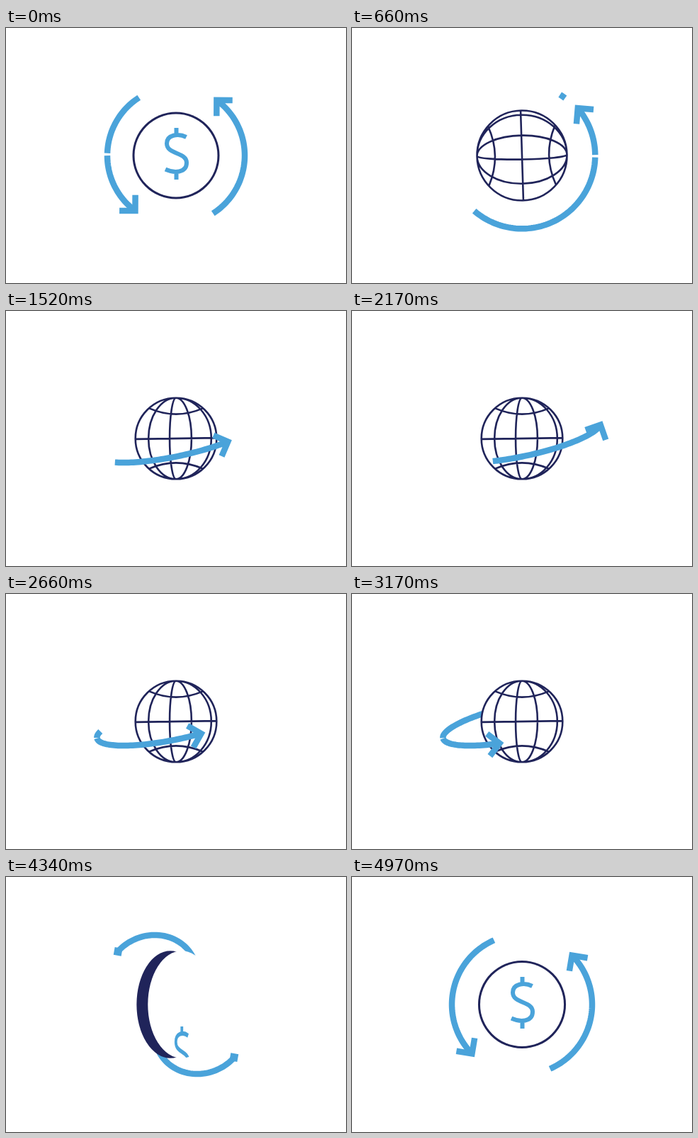
Write an HTML page with a canvas that moves like this. It is 480 by 360 pixels and loops after 5.01 s.

```html
<!DOCTYPE html>
<html lang="en">
<head>
<meta charset="utf-8">
<title>Coin and globe</title>
<style>
html, body { margin: 0; width: 100%; height: 100%; overflow: hidden; background: #fff; }
canvas { display: block; width: 480px; height: 360px; }
</style>
</head>
<body>
<canvas id="stage" width="480" height="360"></canvas>
<script>
const ctx = document.getElementById('stage').getContext('2d');
const LOOP = 5010, CX = 240, CY = 180;
const BLUE = '#4aa3da', NAVY = '#20245a';
const RAD = Math.PI / 180;

const ramp = (t, a, b) => Math.min(1, Math.max(0, (t - a) / (b - a)));
const smooth = (t, a, b) => { const k = ramp(t, a, b); return k * k * (3 - 2 * k); };
const mix = (a, b, k) => a + (b - a) * k;

// Cubic from v0 to v1 with end speeds m0 and m1 per millisecond
function hermite(t, t0, t1, v0, v1, m0, m1) {
  const k = ramp(t, t0, t1), d = t1 - t0, j = 1 - k;
  return v0 * (1 + 2 * k) * j * j + v1 * k * k * (3 - 2 * k) + d * k * j * (m0 * j - m1 * k);
}

// Tilted orbit, travelled at constant speed along its length
const ORBIT = { a: 114, b: 25, tilt: 12, period: 594.5, share: 0.338 };
const lengths = [0];
for (let i = 1; i <= 360; i++) {
  const r = (i - 0.5) * RAD;
  lengths.push(lengths[i - 1] + Math.hypot(ORBIT.a * Math.sin(r), ORBIT.b * Math.cos(r)) * RAD);
}
const perimeter = lengths[360];
const startTurn = mix(lengths[311], lengths[312], 0.4) / perimeter - 1 - 5.5 / perimeter;
const turnsAt = t => startTurn + (t - 1520) / ORBIT.period;

function orbitAngle(turns) {
  const whole = Math.floor(turns), goal = (turns - whole) * perimeter;
  let i = 1;
  while (i < 360 && lengths[i] < goal) i++;
  return 360 * whole + i - 1 + (goal - lengths[i - 1]) / (lengths[i] - lengths[i - 1]);
}

function ellipsePath(a, b, tilt) {
  const c = Math.cos(tilt * RAD), s = Math.sin(tilt * RAD);
  return deg => {
    const u = a * Math.cos(deg * RAD), v = -b * Math.sin(deg * RAD);
    return [CX + u * c + v * s, CY - u * s + v * c];
  };
}

const isBack = deg => Math.sin(deg * RAD) > 0;

// side: 'back' or 'front' draws only that half of the path
function arrow(path, tail, head, tip, lag = 0, side = '') {
  const shown = deg => !side || isBack(deg) === (side === 'back');
  if (head <= tail) return;
  ctx.strokeStyle = BLUE;
  ctx.lineWidth = 8.5;
  ctx.lineJoin = 'miter';
  ctx.beginPath();
  const steps = Math.ceil((head - tail) / 2);
  let pen = false;
  for (let i = 0; i <= steps; i++) {
    const deg = mix(tail, head, i / steps);
    if (!shown(deg)) { pen = false; continue; }
    const p = path(deg);
    pen ? ctx.lineTo(...p) : ctx.moveTo(...p);
    pen = true;
  }
  ctx.stroke();
  if (tip <= 0 || !shown(head)) return;
  const [x, y] = path(head), p = path(head - lag - 0.5), q = path(head - lag + 0.5);
  ctx.save();
  ctx.translate(x, y);
  ctx.rotate(Math.atan2(q[1] - p[1], q[0] - p[0]));
  ctx.beginPath();
  const arm = 15.8 * tip;
  ctx.moveTo(-arm, -arm);
  ctx.lineTo(0, 0);
  ctx.lineTo(-arm, arm);
  ctx.stroke();
  ctx.restore();
}

function disc(x, rx, ry, color) {
  ctx.beginPath();
  ctx.ellipse(x, CY, Math.max(0, rx), Math.max(0, ry), 0, 0, 7);
  ctx.fillStyle = color;
  ctx.fill();
}

function dollar() {
  ctx.strokeStyle = BLUE;
  ctx.lineWidth = 6;
  ctx.beginPath();
  ctx.moveTo(14.5, -26);
  ctx.bezierCurveTo(3, -32, -13, -29, -13, -17);
  ctx.bezierCurveTo(-13, -1, 15, -5, 15, 10);
  ctx.bezierCurveTo(15, 25, -3, 25, -15, 19.5);
  ctx.moveTo(0.5, -39);
  ctx.lineTo(0.5, -29);
  ctx.moveTo(0.5, 23);
  ctx.lineTo(0.5, 34);
  ctx.stroke();
}

// turn: 0 edge-on to 1 facing; rim: 0 thick edge only to 1 full thin outline
function coin(turn, radius, rim, lift) {
  const rx = radius * turn;
  const depth = 20.5 * Math.sqrt(Math.max(0, 1 - turn * turn)) * (rim < 1 ? 1 : 0.3);
  disc(CX - depth / 2, rx, radius, NAVY);
  ctx.save();
  disc(CX + depth / 2, rx - 3 * rim, radius - 3 * rim, '#fff');
  ctx.clip();
  ctx.translate(CX + depth / 2, CY + lift);
  ctx.scale(Math.max(0.001, turn), 1);
  dollar();
  ctx.restore();
}

function globe(turn, radius, roll, spin) {
  ctx.save();
  ctx.translate(CX, CY);
  ctx.scale(Math.max(0.001, turn), 1);
  ctx.rotate(roll * RAD);
  ctx.scale(radius, radius);
  ctx.beginPath();
  ctx.arc(0, 0, 1, 0, 2 * Math.PI);
  ctx.fillStyle = '#fff';
  ctx.fill();
  for (const lon of [-42.7, -9, 22.5, 60.4]) {
    const w = Math.sin((lon + spin) * RAD);
    ctx.moveTo(0, -1);
    ctx.ellipse(0, 0, Math.abs(w), 1, 0, -Math.PI / 2, Math.PI / 2, w < 0);
  }
  ctx.moveTo(-1, 0.015);
  ctx.lineTo(1, -0.015);
  for (const y of [-1, 1]) {
    ctx.moveTo(-0.65, y * 0.74);
    ctx.quadraticCurveTo(0, y * 0.46, 0.65, y * 0.74);
  }
  ctx.restore();
  ctx.strokeStyle = NAVY;
  ctx.lineWidth = 2.6;
  ctx.lineJoin = 'round';
  ctx.stroke();
}

function drawCenter(t) {
  if (t < 300) {
    coin(Math.cos(ramp(t, 120, 300) * Math.PI / 2), mix(61.5, 63, ramp(t, 0, 300)), 1, 0);
  } else if (t < 4150) {
    const turn = t < 1000
      ? Math.sin(ramp(t, 300, 480) * Math.PI / 2)
      : Math.cos(ramp(t, 3900, 4150) * Math.PI / 2);
    const radius = t < 660
      ? mix(60, 63.5, smooth(t, 300, 660))
      : mix(63.5, 57.3, smooth(t, 660, 1000)) + 13 * smooth(t, 3900, 4150);
    const roll = t < 660
      ? hermite(t, 300, 660, -10, -90, -0.1, -0.5)
      : hermite(t, 660, 1100, -90, -360, -0.9, 0);
    globe(turn, radius, roll, 4 * (1 - smooth(t, 660, 1100)));
  } else {
    const radius = t < 4450
      ? hermite(t, 4150, 4450, 70, 77, 0.03, 0)
      : hermite(t, 4450, LOOP, 77, 61.5, 0, -0.01);
    const lift = hermite(t, 4200, 4640, 125, 0, -0.38, 0);
    coin(Math.sin(ramp(t, 4150, 4590) * Math.PI / 2), radius, smooth(t, 4340, 4520), lift);
  }
}

function drawLongArrow(t, side) {
  if (t >= 4100) return;
  const joint = 1140;
  const round = 97 + 0.0095 * t;
  const flat = smooth(t, 880, joint);
  const path = ellipsePath(mix(round, ORBIT.a, flat), mix(round, ORBIT.b, flat), ORBIT.tilt * flat);
  let head, tail;
  if (t < 660) {
    head = hermite(t, 0, 660, -846.6, -680, 0.215, 0.3);
    tail = head - mix(111, 171, smooth(t, 0, 660));
  } else {
    const end = Math.max(t, joint);
    head = orbitAngle(turnsAt(end));
    tail = orbitAngle(turnsAt(end) - ORBIT.share * (1 - smooth(t, 3880, 4100)));
    if (t < joint) {
      const span = mix(171, head - tail, smooth(t, 660, joint));
      head = hermite(t, 660, joint, -680, head, 0.3, 0.41);
      tail = head - span;
    }
  }
  arrow(path, tail, head, 1 - ramp(t, 3950, 4100), 9 * (1 - ramp(t, 0, 660)), side);
}

function drawFadingArrow(t) {
  if (t >= 690) return;
  const head = hermite(t, 0, 660, 53.5, 58, 0.215, 0);
  const tail = hermite(t, 0, 690, -57.6, 58, 0.215, 0.17);
  const r = 97 + 0.0065 * t;
  arrow(ellipsePath(r, r, 0), tail, head, 1 - ramp(t, 60, 330), 9);
}

// Two spirals that swing out, then settle around the coin
function drawPair(t) {
  if (t < 4080) return;
  const before = Math.min(0, t - 4340);
  const head = hermite(t, 4340, LOOP, 138, 413.5, 0.55, 0.215) + 0.55 * before;
  const span = t < 4340 ? 68 * ramp(t, 4080, 4340) : mix(68, 111, smooth(t, 4340, 4800));
  const radius = t < 4600
    ? hermite(t, 4340, 4600, 111, 138, 0.19, 0) + 0.12 * before
    : hermite(t, 4600, LOOP, 138, 97, 0, -0.03);
  const inward = 40 * (1 - smooth(t, 4340, 4600));
  for (const half of [0, 180]) {
    const tipAngle = head + half;
    const path = deg => {
      const back = Math.max(0, tipAngle - deg) / Math.max(1, span);
      const r = radius - inward * back * back;
      return [CX + r * Math.cos(deg * RAD), CY - r * Math.sin(deg * RAD)];
    };
    arrow(path, tipAngle - span, tipAngle, mix(0.1, 1, ramp(t, 4300, 4480)), 9);
  }
}

function draw(t) {
  ctx.fillStyle = '#fff';
  ctx.fillRect(0, 0, 480, 360);
  drawPair(t);
  drawLongArrow(t, 'back');
  drawCenter(t);
  drawLongArrow(t, 'front');
  drawFadingArrow(t);
}

const start = performance.now();
function tick() {
  draw((performance.now() - start) % LOOP);
  requestAnimationFrame(tick);
}
tick();
</script>
</body>
</html>
```
